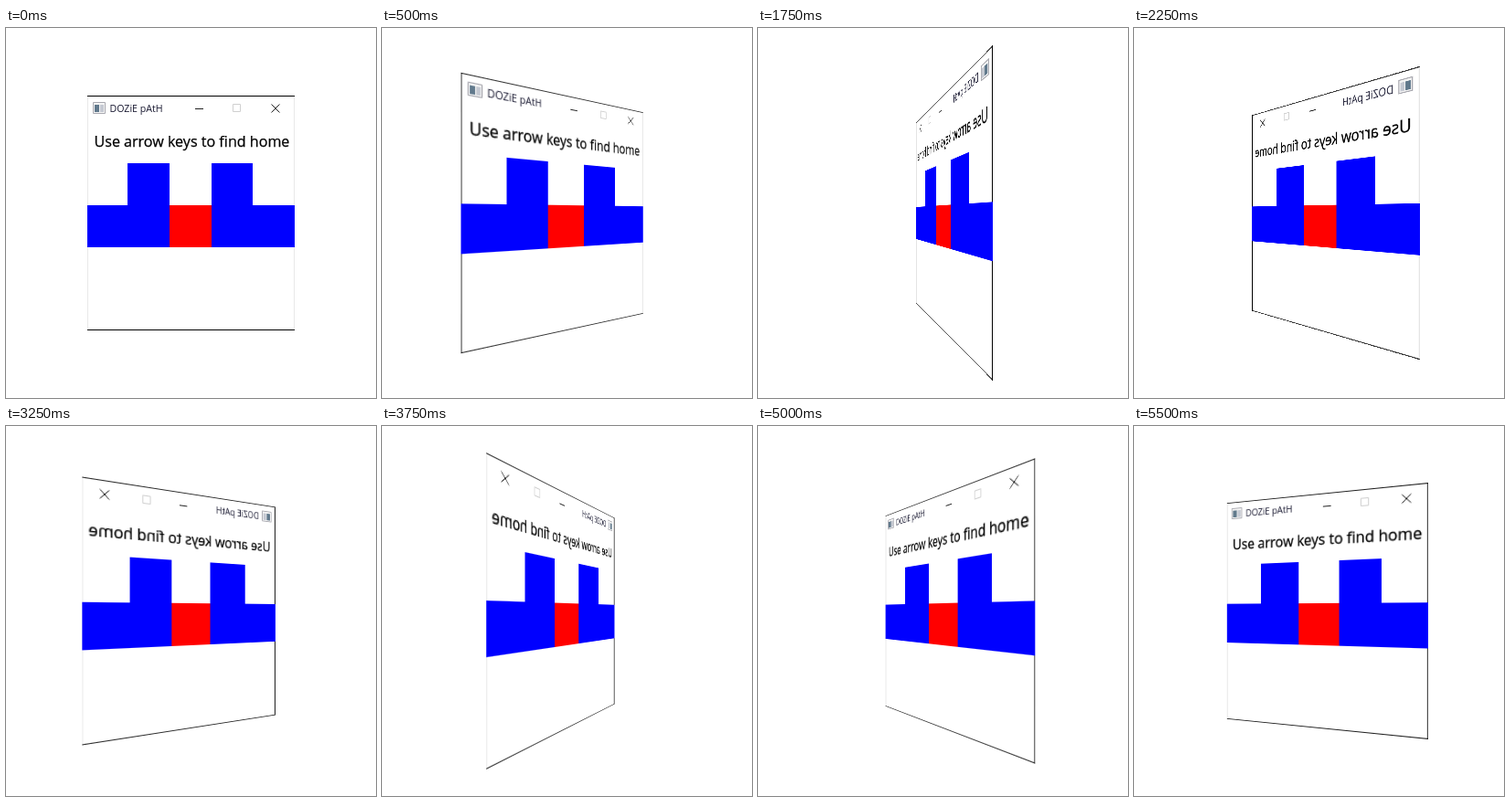
Recreate the animation shown at these times as an HTML page. Size 405 by 405 pixels, loop 5.75 s.

```html
<!DOCTYPE html>
<html lang="en">
<head>
<meta charset="utf-8">
<title>Spinning window</title>
<style>
  html, body { margin: 0; width: 100%; height: 100%; overflow: hidden; background: #fff; }
  svg { position: absolute; left: 89px; top: 74px; width: 227px; height: 257px; }
  text { font-family: "Open Sans", sans-serif; }
</style>
</head>
<body>
<svg id="win" viewBox="89 74 227 257">
  <path fill="#fff" d="M89 74h227v257h-227z"/>
  <rect id="left" x="89" y="74" height="257"/>
  <rect id="right" y="74" height="257"/>
  <path id="ends" d="M89 74h227v1h-227zM89 330h227v1h-227z"/>

  <!-- title bar -->
  <path fill="#f4f4f4" stroke="#a9a9b0" d="M95.5 81.5h13v12h-13z"/>
  <path fill="#61798c" d="M97 84h5v8h-5z"/>
  <path fill="#c5c9d2" d="M103 84h4v8h-4z"/>
  <text x="113.5" y="92" font-size="10.6" fill="#181830">DOZiE pAtH</text>
  <g fill="none">
    <path stroke="#222" d="M207 88.5h9M290.5 83.5l9 9M299.5 83.5l-9 9"/>
    <path stroke="#d0d0d0" d="M248.5 83.5h8v8h-8z"/>
  </g>

  <text x="96.5" y="130" font-size="16.1" stroke="#000" stroke-width=".25">Use arrow keys to find home</text>

  <!-- maze -->
  <g shape-rendering="crispEdges">
    <path fill="#00f" d="M89 194h44v-46h46v46h46v-46h45v46h46v45.6h-227z"/>
    <path fill="#f00" d="M179 194h46v45.6h-46z"/>
  </g>
</svg>
<script>
const STEP = 250, STEPS = 23, DEPTH = 358, HALF = 113.5;
const [win, left, right, ends] =
  ['win', 'left', 'right', 'ends'].map(id => document.getElementById(id));

// Widen a side line so that it keeps its width on screen.
function drawSide(line, side, sin, cos, dark) {
  const scale = DEPTH / (DEPTH + side * HALF * sin);
  const width = Math.min(12, .8 / (Math.abs(cos) * scale * scale));
  line.setAttribute('width', width);
  line.setAttribute('x', side < 0 ? 89 : 316 - width);
  line.setAttribute('fill', dark ? '#000' : '#e4e4e4');
}

function draw(now) {
  const step = Math.floor(now / STEP) % STEPS;
  const angle = step / STEPS * 2 * Math.PI;
  const sin = Math.sin(angle), cos = Math.cos(angle);
  const leftDark = (sin > 0) !== (cos < -.5);
  drawSide(left, -1, sin, cos, step && leftDark);
  drawSide(right, 1, sin, cos, step && !leftDark);
  ends.setAttribute('opacity', 1 - .35 * Math.abs(sin));
  win.style.transform = `perspective(${DEPTH}px) rotateY(${angle}rad)`;
}

const start = performance.now();
function tick() {
  draw(performance.now() - start);
  requestAnimationFrame(tick);
}
tick();
</script>
</body>
</html>
```
